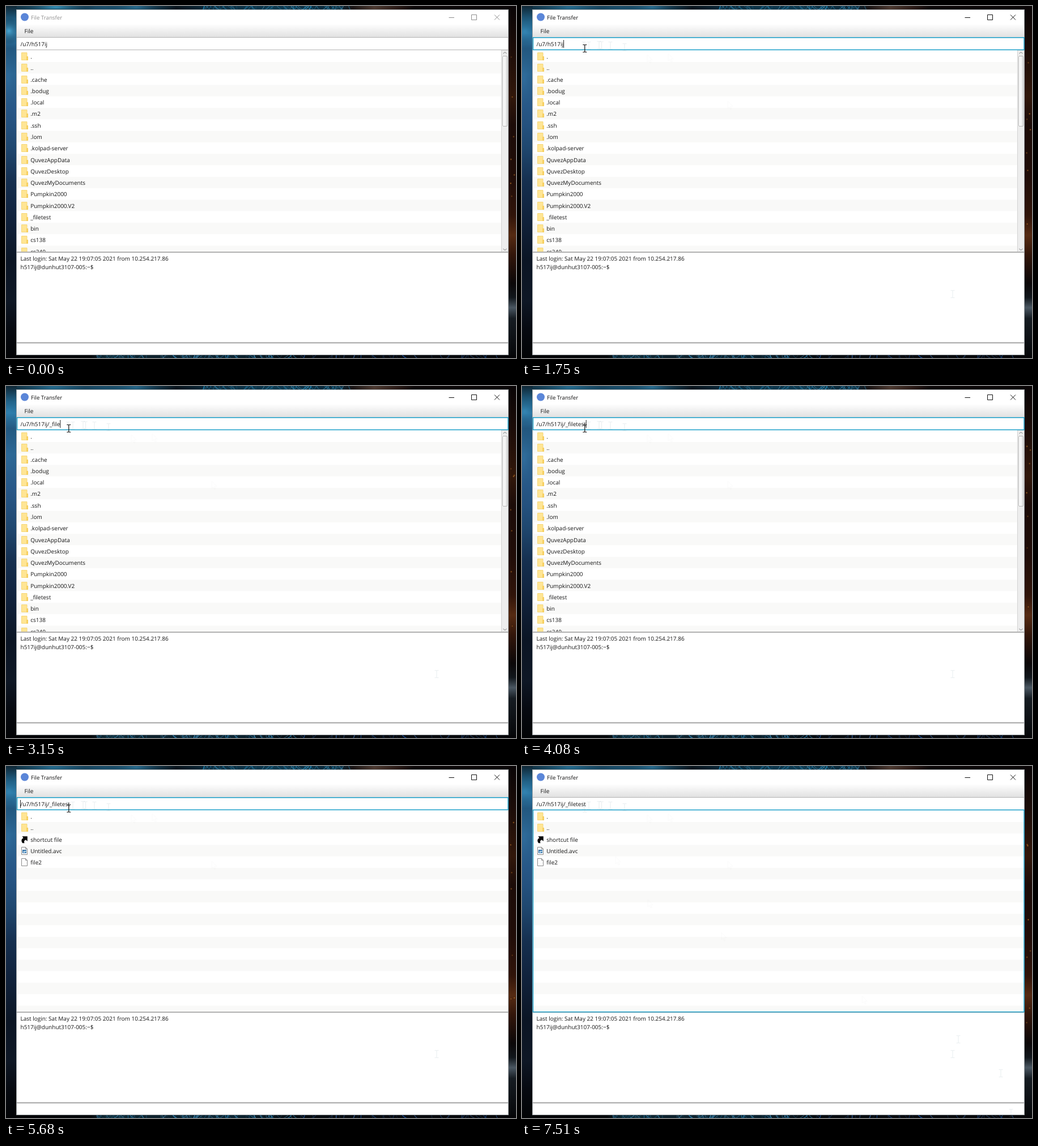
An HTML page with a canvas for the animation above (7580 ms loop, 900 by 622 pixels).

```html
<!DOCTYPE html>
<html lang="en">
<head>
<meta charset="utf-8">
<title>File Transfer</title>
<style>
html, body { margin: 0; width: 100%; height: 100%; overflow: hidden; background: #05070a; }
canvas, svg { position: absolute; left: 0; top: 0; display: block; }
text { font: 10px "Open Sans", "Noto Sans", sans-serif; fill: #161616; text-rendering: geometricPrecision; white-space: pre; }
#title { font-size: 9.7px; }
</style>
</head>
<body>
<canvas id="wall" width="900" height="622"></canvas>
<svg id="stage" width="900" height="622" viewBox="0 0 900 622">
  <defs>
    <linearGradient id="menu" x1="0" y1="0" x2="0" y2="1">
      <stop offset="0" stop-color="#fdfdfd"/><stop offset="1" stop-color="#e1e1e1"/>
    </linearGradient>
    <linearGradient id="thumb"><stop offset="0" stop-color="#fff"/><stop offset="1" stop-color="#e6e6e6"/></linearGradient>
    <clipPath id="listClip"><rect x="20" y="78" width="866" height="356"/></clipPath>
    <g id="folder">
      <path d="M.5 .5H10V7.5H11.5V13.5H.5Z" fill="#ffe594" stroke="#f6d778"/>
      <path d="M9.5 7.5H11.5V13.5H9.5Z" fill="#fcd766" stroke="#efc654" stroke-width=".7"/>
    </g>
    <g id="page">
      <path d="M.5 .5H7.5L10.5 3.5V13.5H.5Z" fill="#fdfdfd" stroke="#8b8b8b"/>
      <path d="M7.5 .5V3.5H10.5" fill="none" stroke="#8b8b8b"/>
    </g>
    <g id="media">
      <use href="#page"/>
      <path d="M2 5H9V11H2Z" fill="#3b78ad"/>
      <path d="M3 10L5 6.5L6.4 10Z" fill="#d8edf8"/><circle cx="7.4" cy="8" r="1.2" fill="#b9dced"/>
    </g>
    <path id="link" d="M2.2 13.3C-.6 9.5 0 5.6 3.6 4.2L1.6 1.2H10.8V10L8 7.4C5.2 8 4.4 10.2 5.6 13.3Z" fill="#080808"/>
    <path id="beam" d="M-3.5 -6.5H-1L0 -5.7L1 -6.5H3.5M0 -5.7V5.7M-3.5 6.5H-1L0 5.7L1 6.5H3.5" fill="none" stroke-width="1.2"/>
    <path id="arrow" d="M0 0V13L3 10.3L5 15L7 14.1L5 9.6H9Z" fill="#fff"/>
  </defs>
  <rect x="18.5" y="6.5" width="868" height="610" fill="#fff" stroke="#9da2a5"/>
  <circle cx="33" cy="19.5" r="7" fill="#5b86d8"/>
  <text id="title" x="44" y="23.5">File Transfer</text>
  <path id="buttons" d="M781.5 20.5H791M821.5 15.5H830.5V24.5H821.5ZM862 15.5L871 24.5M871 15.5L862 24.5" fill="none"/>
  <rect x="19" y="33" width="867" height="22" fill="url(#menu)"/>
  <path d="M19 55.5H886M19 77.5H886" stroke="#b4b4b4"/>
  <text x="32.5" y="48.3">File</text>
  <text id="path" x="25.5" y="70.5"></text>
  <path id="caret" d="M0 60V74" stroke="#222"/>
  <g id="lists" clip-path="url(#listClip)"></g>
  <path d="M19 435H886M19 595H886" stroke="#b1b1b1" stroke-width="2"/>
  <path d="M19 596.5H886" stroke="#e6e6e6"/>
  <text x="25.5" y="450">Last login: Sat May 22 19:07:05 2021 from 10.254.217.86</text>
  <text x="25.5" y="465">h517ij@dunhut3107-005:~$</text>
  <rect id="focus" x="19.5" width="866.5" fill="none" stroke="#1a9fc9" stroke-width="1.5"/>
  <g id="trail"></g>
  <circle id="press" r="10" fill="#fff02a" opacity=".88"/>
  <g id="pointer"></g>
</svg>
<script>
const LOOP = 7580, STEP = LOOP / 108, ROW = 20.28;
const HOME = '/u7/h517ij', TYPED = '/_filetest';
const KEYS = [2240, 2400, 2590, 2730, 2870, 3010, 3290, 3430, 3570, 3710];
const OPEN = 4550, FOCUS = 760, REFOCUS = 6680;
const $ = id => document.getElementById(id);

function add(parent, tag, attrs, text) {
  const el = document.createElementNS('http://www.w3.org/2000/svg', tag);
  for (const k in attrs) el.setAttribute(k, attrs[k]);
  if (text) el.textContent = text;
  return parent.appendChild(el);
}
const show = (el, on) => { el.style.display = on ? '' : 'none'; };

// File lists
function makeList(items) {
  const g = add($('lists'), 'g', {});
  for (let i = 0; i < 18; i++) {
    const y = 78.7 + i * ROW;
    add(g, 'rect', { x: 20, y, width: 866, height: ROW, fill: i % 2 ? '#f9f9f8' : '#fff' });
    if (!items[i]) continue;
    const [name, icon = 'folder'] = items[i];
    add(g, 'use', { href: '#' + icon, x: 27, y: Math.round(y + 3.3) });
    add(g, 'text', { x: 43.2, y: y + 14.3 }, name);
  }
  return g;
}
const homeList = makeList(['.', '..', '.cache', '.bodug', '.local', '.m2', '.ssh', '.lom', '.kolpad-server',
  'QuvezAppData', 'QuvezDesktop', 'QuvezMyDocuments', 'Pumpkin2000', 'Pumpkin2000.V2',
  '_filetest', 'bin', 'cs138', 'cs240'].map(n => [n]));
const testList = makeList([['.'], ['..'], ['shortcut file', 'link'], ['Untitled.avc', 'media'], ['file2', 'page']]);
add(homeList, 'rect', { x: 874.5, y: 78, width: 12, height: 357, fill: '#ededed', stroke: '#d2d2d2' });
add(homeList, 'rect', { x: 876.5, y: 88.5, width: 8, height: 124, rx: 1.5, fill: 'url(#thumb)', stroke: '#b8b8b8' });
add(homeList, 'path', { d: 'M877.5 84L880.5 81.5L883.5 84M877.5 429L880.5 431.5L883.5 429', fill: 'none', stroke: '#777' });

// Pointer stops: time, x, y, shape
const STOPS = [
  [340, 760, 509, 'beam'], [410, 363, 168, 'arrow'], [480, 258, 84, 'arrow'], [550, 221, 86, 'arrow'],
  [620, 181, 73, 'beam'], [690, 156, 70, 'beam'], [760, 140.5, 69.5, 'beam'], [900, 136, 69, 'beam'],
  [970, 118, 70, 'beam'], [1040, 109, 70, 'beam'], [1110, 110.8, 75, 'beam'],
  [6470, 165, 160, 'arrow'], [6540, 222, 236, 'arrow'], [6820, 352, 294, 'arrow'], [6890, 600, 406, 'arrow'],
  [6960, 770, 483, 'beam'], [7030, 845, 543, 'beam'], [7100, 863, 613, 'beam'], [7170, 0, 0, '']
];
const mark = (parent, x, y, shape, stroke, opacity) =>
  add(parent, 'use', { href: '#' + shape, x, y, stroke, opacity });
const ghosts = STOPS.map(([, x, y, s]) => s && mark($('trail'), x, y, s,
  s === 'beam' ? '#7c9ba8' : '#777', s === 'beam' ? .16 : .03));
const pointers = STOPS.map(([, x, y, s]) => s && mark($('pointer'), x, y, s, '#111', 1));

// Wallpaper visible around the window
const ctx = $('wall').getContext('2d');
function strip(x, y, w, h, stops) {
  const down = h > w;
  const g = ctx.createLinearGradient(x, y, down ? x : x + w, down ? y + h : y);
  for (const [p, c] of stops) g.addColorStop(p / (down ? h : w), c);
  ctx.fillStyle = g;
  ctx.fillRect(x, y, w, h);
}
function seeded(s) {
  return () => (s = (s * 16807) % 2147483647) / 2147483647;
}
function strands(x, y, w, n, seed, hue, light = 18) {
  const rnd = seeded(seed);
  for (let i = 0; i < n; i++) {
    const px = x + rnd() * w, lean = (rnd() - .5) * 24;
    ctx.strokeStyle = `hsla(${hue},${45 + rnd() * 30}%,${light + rnd() * 32}%,${.25 + rnd() * .55})`;
    ctx.lineWidth = .6 + rnd();
    ctx.beginPath();
    ctx.moveTo(px, y);
    ctx.quadraticCurveTo(px + lean * .2, y + 4, px + lean, y + 8);
    ctx.stroke();
  }
}
function blob(x, y, rx, ry, color) {
  ctx.save();
  ctx.translate(x, y);
  ctx.scale(rx, ry);
  const g = ctx.createRadialGradient(0, 0, 0, 0, 0, 1);
  g.addColorStop(0, color);
  g.addColorStop(1, 'transparent');
  ctx.fillStyle = g;
  ctx.fillRect(-1, -1, 2, 2);
  ctx.restore();
}
function wallpaper(t) {
  const start = Math.max(0, 1 - t / 600), wave = Math.sin(t / LOOP * Math.PI * 4);
  strip(0, 0, 900, 8, [[0, '#0d2836'], [80, '#1f5f80'], [140, '#17455f'], [230, '#1d5877'], [300, '#08131b'],
    [360, '#0a2b3d'], [480, '#0e3a50'], [590, '#0a2534'], [612, '#191313'], [650, '#4b382f'], [690, '#2a1a16'],
    [720, '#0b0607'], [900, '#080405']]);
  strip(0, 0, 19, 622, [[0, '#0f2735'], [28, '#22658c'], [48, '#2d7cab'], [75, '#235a83'], [120, '#2c6896'],
    [180, '#28598a'], [250, '#1f476f'], [310, '#152f4f'], [380, '#10213a'], [450, '#0b1524'],
    [520, '#0e1725'], [575, '#06090f'], [622, '#020305']]);
  strip(887, 0, 13, 622, [[0, '#090506'], [80, '#1d0d08'], [160, '#31170a'], [210, '#1c0c08'], [300, '#200d08'],
    [370, '#301409'], [405, '#552a12'], [440, '#32160a'], [490, '#0b0708'], [515, '#11161b'], [533, '#4a5762'],
    [552, '#161c22'], [622, '#050608']]);
  strip(0, 617, 900, 5, [[0, '#020305'], [150, '#04070a'], [180, '#0e2d3b'], [260, '#0d212c'], [400, '#0b2533'],
    [510, '#060b10'], [700, '#080a0e'], [900, '#050507']]);
  strands(350, -1, 255, 90, 41, 199, 25);
  strands(160, 616, 350, 95, 73, 202, 25);
  strands(520, 616, 360, 40, 19, 215);
  blob(88, 2, 70, 10, `rgba(61,166,210,${.2 + start * .6})`);
  blob(230, 2, 55, 10, `rgba(61,150,195,${.35 + wave * .1})`);
  blob(5, 44, 24, 24, `rgba(87,190,235,${.16 + start * .5 + wave * .08})`);
  blob(4, 130, 24, 80, `rgba(65,137,190,${.14 + wave * .08})`);
  // Drifting embers
  const rnd = seeded(97);
  for (let i = 0; i < 7; i++) {
    const y = 90 + (rnd() * 370 + 370 - t * (.02 + rnd() * .03)) % 370;
    const glow = .3 + .5 * Math.abs(Math.sin(t / 430 + i * 2));
    blob(889 + rnd() * 9, y, 2.5, 2.5, `rgba(255,151,48,${glow})`);
  }
}

function draw(t) {
  const active = t >= FOCUS, opened = t >= OPEN, refocused = t >= REFOCUS;
  const count = KEYS.filter(k => t >= k).length;
  wallpaper(t);

  $('title').style.fill = active ? '#111' : '#909090';
  $('buttons').setAttribute('stroke', active ? '#111' : '#8c8c8c');
  $('path').textContent = HOME + TYPED.slice(0, count);
  show(homeList, !opened);
  show(testList, opened);

  show($('focus'), active);
  $('focus').setAttribute('y', refocused ? 77.6 : 55.8);
  $('focus').setAttribute('height', refocused ? 357 : 21.6);

  const origin = [1260, ...KEYS, 4600].filter(k => t >= k).pop();
  const blink = origin && !refocused && (t - origin) % 1000 < 500;
  show($('caret'), blink);
  const cx = opened ? 25.5 : 25.5 + $('path').getComputedTextLength() + .5;
  $('caret').setAttribute('transform', `translate(${cx} 0)`);

  const now = STOPS.filter(s => t >= s[0]).length - 1;
  STOPS.forEach((s, i) => {
    if (!s[3]) return;
    show(ghosts[i], i < now);
    show(pointers[i], i === now);
  });
  const first = t >= 690 && t < 890, second = t >= 6600 && t < 6810;
  show($('press'), first || second);
  if (first || second) {
    $('press').setAttribute('cx', STOPS[now][1] - 1.5);
    $('press').setAttribute('cy', STOPS[now][2] - .5);
  }
}

const begin = performance.now();
function tick() {
  const t = (performance.now() - begin) % LOOP;
  draw(Math.floor((t + 6) / STEP) % 108 * STEP);
  requestAnimationFrame(tick);
}
draw(0);
tick();
</script>
</body>
</html>
```
